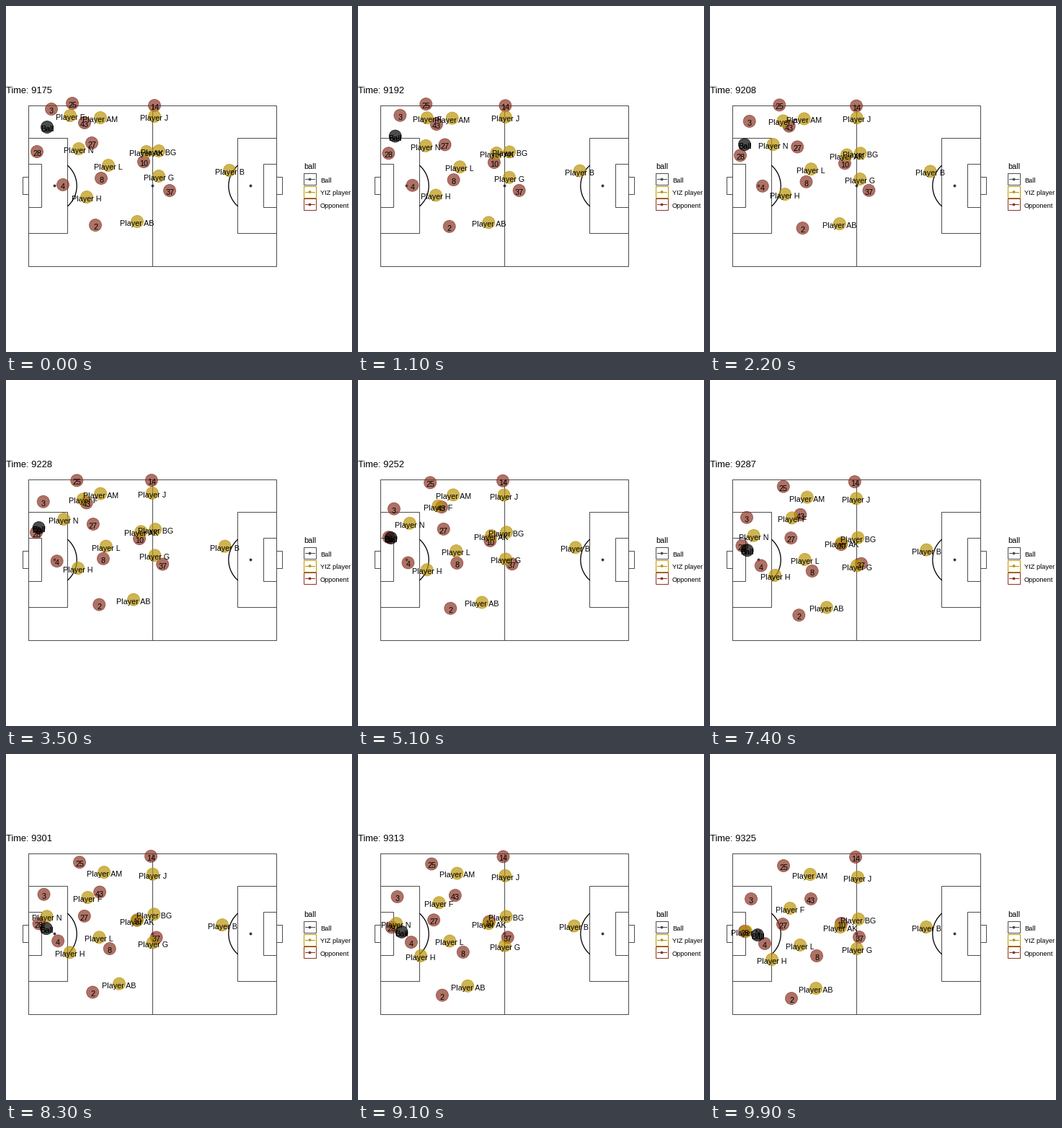
A matplotlib script that plays this animation: 480x480 px, repeating every 10000 ms.

```python
import numpy as np
import matplotlib.pyplot as plt
from matplotlib.animation import FuncAnimation
from matplotlib.patches import Arc, Circle, Rectangle

plt.rcParams["font.family"] = "Liberation Sans"

FRAMES = 100
PX = 0.72  # points per pixel at 100 dpi
GOLD, RED, BLACK = "#BB9408", "#8B3626", "#000000"
LINE = "#4D4D4D"

fig = plt.figure(figsize=(4.8, 4.8), dpi=100, facecolor="white")
ax = fig.add_axes([0, 0, 1, 1])
ax.set(xlim=(0, 480), ylim=(480, 0))
ax.axis("off")


def box(x0, y0, x1, y1, color=LINE):
    ax.add_patch(Rectangle((x0, y0), x1 - x0, y1 - y0,
                           fill=False, ec=color, lw=PX, zorder=1))


def dot(x, y, color):
    ax.add_patch(Circle((x + 0.5, y + 0.5), 1.9, fc=color, lw=0, zorder=1))


def label(x, y, text, size, **kw):
    return ax.text(x, y, text, fontsize=size * PX, va="baseline", **kw)


def draw_pitch():
    box(31, 138, 375, 361)
    box(31, 138, 203, 361)
    for x, way in ((31, 1), (375, -1)):
        for depth, top, bottom in ((54, 183, 315), (18, 219, 279), (-8, 237, 261)):
            left, right = sorted((x, x + way * depth))
            box(left, top, right, bottom)
        ax.add_patch(Arc((x + way * 29 + 0.5, 249.5), 75.4, 75.4,
                         angle=0 if way > 0 else 180, theta1=-49, theta2=49,
                         ec=BLACK, lw=1.3 * PX, zorder=1))
    for x in (67, 203, 339):
        dot(x, 249, "#333333")


def draw_legend():
    label(413, 226, "ball", 10.7)
    rows = ((LINE, "Ball"), (GOLD, "YIZ player"), (RED, "Opponent"))
    for n, (color, text) in enumerate(rows):
        y = 240 + 17.5 * n
        box(413, y - 8, 430, y + 8, color)
        ax.plot((415, 428), (y, y), color=color, lw=PX, zorder=1)
        dot(421, y, color)
        label(436, y + 5, text, 9.3)


class Runner:
    """Glides from (x, y) by (dx, dy), swinging sideways on the way.

    Vertical motion starts slowly; a negative lag starts it early.
    """

    def __init__(self, name, color, x, y, dx, dy, swing=-3, lag=0.15):
        self.color, self.start, self.move = color, (x, y), (dx, dy)
        self.swing, self.lag = swing, lag
        self.tag = label(x, y, name, 10.7, ha="center", zorder=3)

    def at(self, t):
        (x, y), (dx, dy) = self.start, self.move
        arch = 4 * t * (1 - t)
        return x + dx * t + self.swing * arch, y + dy * (t - self.lag * arch)


def rival(number, *path, **kw):
    return Runner(str(number), RED, *path, **kw)


def home(letters, *path, **kw):
    return Runner(f"Player {letters}", GOLD, *path, **kw)


draw_pitch()
draw_legend()
title = label(0, 121, "", 12.9)

runners = [
    rival(25, 92, 135, 10, 20, swing=3),
    rival(3, 63, 143, -6, 58, swing=-10, lag=-0.1),
    rival(14, 206, 138, -4, 5),
    rival(43, 109, 162, 31, 39, swing=-9),
    rival(28, 43, 202, 5, 44),
    rival(27, 119, 190, -18, 46, swing=9),
    rival(10, 191, 216, -9, 19),
    rival(4, 79, 248, -3, 15, swing=-8),
    rival(8, 132, 239, 16, 41),
    rival(37, 227, 256, -20, -2),
    rival(2, 124, 304, -11, 35, swing=10),
    home("F", 89, 152, 22, 62, swing=11),
    home("AM", 131, 155, 8, 12),
    home("J", 206, 153, -1, 18),
    home("N", 101, 198, -51, 48, lag=0.5),
    home("AK", 195, 202, -14, 38),
    home("BG", 212, 201, -6, 28),
    home("L", 142, 221, -17, 44, swing=3),
    home("G", 212, 236, -8, 34),
    home("H", 112, 265, -26, 20, lag=0.6),
    home("B", 310, 228, -10, 12),
    home("AB", 182, 299, -35, 26, swing=8),
]
# The ball label is printed twice, which makes it bolder
runners += [Runner("Ball", BLACK, 57, 168, 9, 83, swing=-16, lag=-0.1)
            for _ in range(2)]

bodies = runners[:-1]
colors = [r.color for r in bodies]
dots = ax.scatter(*np.transpose([r.at(0) for r in bodies]), s=(17 * PX) ** 2,
                  c=colors, edgecolors=colors, alpha=0.7,
                  linewidths=0.9 * PX, zorder=2)


def update(step):
    t = step / (FRAMES - 1)
    dots.set_offsets([r.at(t) for r in bodies])
    for r in runners:
        x, y = r.at(t)
        r.tag.set_position((x, y + 6))
    title.set_text(f"Time: {9175 + round(150 * t)}")
    return [dots, title]


anim = FuncAnimation(fig, update, frames=FRAMES, interval=100,
                     repeat=True, repeat_delay=0)
plt.show()
```
